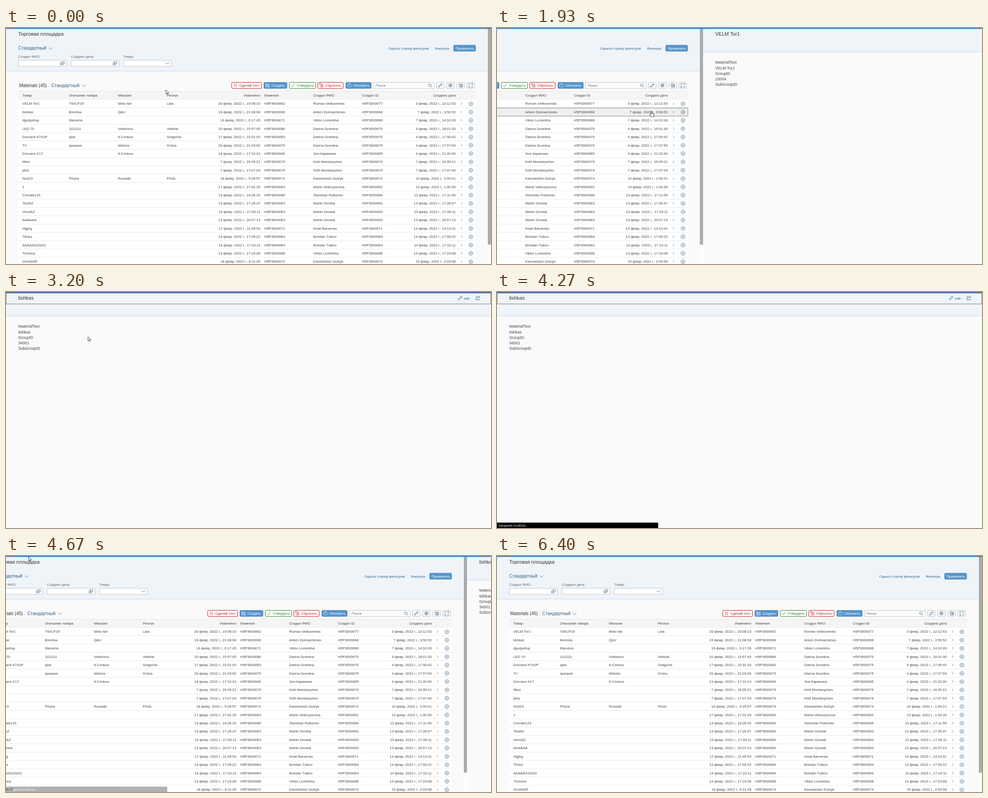
Recreate the animation shown at these times as an HTML page. Size 1071 by 523 pixels, loop 6540 ms.

```html
<!DOCTYPE html>
<html lang="ru">
<head>
<meta charset="utf-8">
<style>
html, body { margin: 0; width: 100%; height: 100%; overflow: hidden; background: #fafafa; }
svg { display: block; width: 100vw; height: 100vh; font-family: "Liberation Sans", Arial, sans-serif; }
.icon { fill: none; stroke-width: .9; }
</style>
</head>
<body>
<svg id="stage" viewBox="0 0 1071 523"></svg>
<script>
const LOOP = 6540, TICK = 200 / 3, W = 1071;
const ROW_TOP = 158.3, ROW_H = 18.42;
const BLUE = '#346187', RED = '#c4161c', GREEN = '#2b7c2b', FILL = '#5496cd', INK = '#444';

const people = {
  77: 'Roman Velikovenka', 68: 'Artem Dolmachenko', 88: 'Viktor Lomeisha', 75: 'Darina Sovelina',
  85: 'Зоя Карвенюк', 79: 'Kirill Mordanyshev', 74: 'Kanstantsin Dulvyk', 62: 'Marta Velkozyorova',
  86: 'Stanislav Polkenko', 83: 'Martin Dovbal', 71: 'Ihnat Barvenau', 84: 'Bohdan Tulkov'
};
// product | description | shop | region | changed | changed by | created by | created
const rows = `VELM Tor1|TW/LP29|Moto fair|Lida|20 23:08:10|62|77|3 12:12:53
tishkas|Brenlow|Q&amp;V||19 21:08:08|68|68|7 3:50:52
djyutjuirtuy|Marveno|||19 0:17:26|71|88|7 14:10:39
LED 70|1111111|Voltamira|Vitebsk|20 15:57:45|86|75|4 16:01:30
Dorvane KT42P|qwe|8 Contour|Soligorsk|17 23:31:20|83|75|4 17:00:42
TV|qweqwe|Molvira|Orsha|20 21:03:00|75|75|4 17:07:59
Dorvane K17||8 Contour||14 17:10:24|66|85|4 21:32:30
IBed||||7 16:35:21|79|79|7 16:35:21
jdsa||||7 17:07:04|79|79|7 17:07:04
No323|Phone|Ruvstall|Pinsk|18 5:29:57|74|74|10 1:00:21
1||||17 17:31:29|83|62|13 1:32:35
Corvale123||||13 19:26:32|86|86|13 17:11:59
TestAZ||||13 17:26:37|83|83|13 17:26:37
VimoAZ||||13 17:39:11|83|83|13 17:39:11
AAAAAA||||13 20:07:13|83|83|13 20:07:13
hfgjhg||||17 11:45:54|71|71|14 14:13:41
TExks||||14 17:09:22|84|84|14 17:09:22
AAAAASSSSS||||14 17:10:11|84|84|14 17:10:11
Trelvora||||14 17:23:08|88|88|14 17:23:08
Ovrelix65||||18 6:11:28|74|74|15 2:03:58`.split('\n').map(r => r.split('|'));

// Text is placed by its left (or end) edge and the middle of its capitals.
const text = (x, y, s, size = 7.8, fill = INK, more = '') =>
  `<text x="${x}" y="${y + size * .36}" font-size="${size}" fill="${fill}" ${more}>${s}</text>`;
const rect = (x, y, w, h, fill, more = '') =>
  `<rect x="${x}" y="${y}" width="${w}" height="${h}" fill="${fill}" ${more}/>`;
const box = (x, y, w, h, fill, stroke, r = 0) => rect(x, y, w, h, fill, `stroke="${stroke}" rx="${r}"`);
const icon = (x, y, d, color = BLUE) =>
  `<path class="icon" transform="translate(${x} ${y})" d="${d}" stroke="${color}"/>`;

const shapes = {
  chevron: 'M-4 -2L0 2L4 -2',
  next: 'M-1.3 -2.5L1.3 0L-1.3 2.5',
  copy: 'M-1 -3.5H4V1H-1ZM-1 -1H-4V3.5H1V1',
  wand: 'M-4 4L1 -1M2 -4V-2M4 -1H2.5M-2 -3.5V-1.5M-3 -2.5H-1M2.5 1.5V3.5M1.5 2.5H3.5M-1 -1L1 1',
  add: 'M-1 -3H-4V3.5H4V0M-4 -1H0M2.5 -4V0M.5 -2H4.5M-2 -4V-2M-2 1.5H2',
  check: 'M-3.5 0L-1 3L4 -3',
  reset: 'M-4 -4L4 4M-4 -1V-4H-1M0 -3.5A3.5 3.5 0 1 1 -3.3 1M1.5 -1.5L-1.5 1.5',
  refresh: 'M-3 3A4 4 0 0 1 1 -3.7M-1 -4.5L1.5 -3.7L0 -1.7M3.2 -2A4 4 0 0 1 -1 3.8',
  search: 'M1.8 1.8L4.2 4.2M2.3 -.6A2.9 2.9 0 1 1 -3.5 -.6A2.9 2.9 0 1 1 2.3 -.6',
  pencil: 'M-4 4L-3 1L2.5 -4L4 -2.5L-1.5 3ZM1 -2.7L2.7 -1',
  gear: 'M3 0A3 3 0 1 1 -3 0A3 3 0 1 1 3 0M1.2 0A1.2 1.2 0 1 1 -1.2 0A1.2 1.2 0 1 1 1.2 0' +
    'M0 -4.2V-3M0 3V4.2M-4.2 0H-3M3 0H4.2M-3 -3L-2.1 -2.1M3 3L2.1 2.1M-3 3L-2.1 2.1M3 -3L2.1 -2.1',
  export: 'M-3 -3.5H1L1.5 -2.5H4V3.5H-2.5V0M-.5 -.5H4M-.5 1.5H4M-4.5 -1.5H-1',
  full: 'M-4 -1.5V-4H-1.5M1.5 -4H4V-1.5M4 1.5V4H1.5M-1.5 4H-4V1.5M1.5 -1.5L4 -4M-1.5 1.5L-4 4',
  cross: 'M4.2 0A4.2 4.2 0 1 1 -4.2 0A4.2 4.2 0 1 1 4.2 0M-1.9 -1.9L1.9 1.9M1.9 -1.9L-1.9 1.9',
  share: 'M0 -3H-4V4H3V1M-1.5 1.5C-1.5 -1 0 -2.5 4 -2.5M2 -4.5L4.2 -2.5L2 -.5'
};

const button = (x, w, label, shape, color, filled) => {
  const ink = filled ? '#fff' : color;
  return box(x + .5, 120.5, w - 1, 13.5, filled ? color : '#fff', filled ? '#4a8bc3' : color, 2) +
    icon(x + 8.5, 127.3, shapes[shape], ink) + text(x + 17, 127.4, label, 7.8, ink);
};
const filter = (x, label, shape) => text(x, 62.7, label, 7.8, '#666') +
  box(x + .5, 71.5, 106, 13.5, '#fff', '#bfc3c7') + icon(x + 97.5, 78.2, shapes[shape]);
const date = s => s.replace(' ', ' февр. 2022 г., ');

const END = 'text-anchor="end"';
const columns = [[36, 'Товар'], [139, 'Описание товара'], [247, 'Магазин'], [355, 'Регион'],
  [561.5, 'Изменено', END], [570.5, 'Изменил'], [678.5, 'Создал ФИО'], [786, 'Создал ID'], [993, 'Создано дата', END]];

function tableRow(row, i) {
  const [product, about, shop, region, changed, editor, author, created] = row;
  const y = 167.6 + i * ROW_H;
  const cells = [product, about, shop, region, date(changed), 'H5P30000' + editor,
    people[author], 'H5P30000' + author, date(created)];
  return cells.map((s, c) => s && text(columns[c][0], y, s, 7.8, INK, columns[c][2])).join('') +
    icon(1006, y, shapes.next, '#777') + icon(1026.7, y + .3, shapes.cross) +
    rect(27, ROW_TOP + (i + 1) * ROW_H - .5, 1011, .8, '#e2e2e2');
}

const list = rect(0, 2, W, 521, '#fafafa') + rect(0, 2, W, 93, '#eff4f9') + rect(0, 95, W, 1.2, '#c8deef') +
  text(27, 13, 'Торговая площадка', 11, '#333') +
  text(27, 44.7, 'Стандартный', 10, BLUE) + icon(98.5, 45.3, shapes.chevron) +
  text(844, 44.7, 'Скрыть строку фильтров', 7.8, BLUE) + text(947, 44.7, 'Фильтры', 7.8, BLUE) +
  box(988.5, 38, 48.5, 13.5, FILL, '#4a8bc3', 2) + text(993, 44.8, 'Применить', 7.8, '#fff') +
  filter(27, 'Создал ФИО:', 'copy') + filter(143, 'Создано дата:', 'copy') + filter(259, 'Товар:', 'chevron') +
  text(29, 127, 'Materials (45)', 10, '#333') + rect(95, 121, 1, 12, '#ddd') +
  text(100, 127.3, 'Стандартный', 10, BLUE) + icon(171.5, 128, shapes.chevron) +
  button(498, 67, 'Сделай тост', 'wand', RED) + button(569, 52, 'Создать', 'add', FILL, true) +
  button(625, 59, 'Утвердить', 'check', GREEN) + button(688, 57, 'Сбросить', 'reset', RED) +
  button(750, 57, 'Обновить', 'refresh', FILL, true) +
  box(811.5, 120.5, 134, 13.5, '#fff', '#bfc3c7') + icon(936.5, 127.2, shapes.search) +
  text(816, 127.4, 'Поиск', 7.8, '#666', 'font-style="italic"') +
  ['pencil', 'gear', 'export', 'full'].map((s, i) =>
    box(950.5 + i * 22.4, 120.5, 17, 13.5, '#f7f7f7', '#bcc3c9', 2) + icon(959 + i * 22.4, 127.3, shapes[s])).join('') +
  rect(27, 140, 1011, 18.3, '#f5f5f5') + rect(27, 139.7, 1011, .8, '#e2e2e2') + rect(27, 157.8, 1011, .8, '#dedede') +
  columns.map(([x, s, more]) => text(x, 149.3, s, 7.8, INK, more)).join('') +
  rect(27, ROW_TOP + .3, 1011, 365, '#fff') + rect(27, 0, 1011, ROW_H, '#efefef', 'id="hover"') +
  rows.map(tableRow).join('') +
  rect(27.5, 177.2, 1010, 18, 'none', 'id="focus" stroke="#777" stroke-width=".9"') +
  rect(1064, 2, 7, 521, '#fdfdfd') + rect(1064, 2, 7, 478, '#ababab');

const details = rect(0, 2, W, 521, '#fafafa') + rect(0, 2, W, 51, '#eff4f9') + rect(0, 52.5, W, 1, '#bfdcee') +
  rect(.5, 2.5, 1070, 24, 'none', 'id="headFocus" stroke="#666" stroke-width=".9"') +
  text(27, 13, '', 11, '#333', 'id="title"') +
  icon(1003, 13.5, shapes.pencil) + text(1011, 13.7, 'edit', 7.8, BLUE) + icon(1042, 13.5, shapes.share) +
  ['MaterialText', '', 'GroupID', '', 'SubGroupID'].map((s, i) =>
    text(27, 76.2 + i * 12.25, s, 8.75, INK, `id="line${i}"`)).join('');

const $ = id => document.getElementById(id);
$('stage').innerHTML = `<g id="list">${list}</g><g id="details">${details}</g>` + rect(0, 0, W, 2, '#427cac') +
  `<g id="status">${rect(-3, 511, 359, 15, '#000', 'rx="2"')}${text(2.5, 517.3, 'Ожидание localhost...', 6.3, '#fff',
    'font-family="Open Sans, Noto Sans, sans-serif"')}</g>
  <path id="cursor" fill="#fff" stroke="#222" stroke-width=".85" stroke-linejoin="round"/>`;

const ARROW = 'M0 0V9.3L2.2 7.3L3.6 10.5L5 9.9L3.6 6.8H6.5Z';
const HAND = 'M-1 1Q0 -.8 1 1V5L5 6Q5.8 6.3 5.7 7.2L4.8 12.5H-.6L-3.8 8.6Q-3.8 7 -2.4 7.5L-1 8.6Z';
// Pointer path: tick, x, y
const path = [[0, 353, 137], [10, 345, 169], [13, 345, 169], [19, 341, 184], [36, 341, 184], [40, 324, 176],
  [42, 324, 176], [48, 181, 99], [51, 127, 78], [52, 127, 78], [58, 30, -14], [66, 40, -13], [70, 50, 1.5],
  [76, 150, 75], [81, 204, 200], [86, 69, 508], [90, 52, 530], [99, 52, 530]];

const clamp = v => Math.max(0, Math.min(1, v));
const ease = v => v < .5 ? .5 * (2 * v) ** 2.5 : 1 - .5 * (2 - 2 * v) ** 2.5;
const slide = (k, start, length) => ease(clamp((k - start) / length));
const show = (id, on) => $(id).setAttribute('visibility', on ? 'visible' : 'hidden');
const move = (id, x, y = 0) => $(id).setAttribute('transform', `translate(${x} ${y})`);

function pointer(k) {
  const i = path.findIndex(p => p[0] > k);
  const [a, x, y] = path[i - 1], [b, u, v] = path[i], f = (k - a) / (b - a);
  return [x + (u - x) * f, y + (v - y) * f];
}

function draw(now) {
  // Time advances in even ticks, and the pages slide by whole pixels.
  const k = Math.floor((now % LOOP + 4) / TICK);
  const shift = Math.round(W * (slide(k, 25.81, 6) - slide(k, 66.15, 4.8)));
  move('list', -shift);
  move('details', W - shift);

  const [x, y] = pointer(k);
  const overRows = y > ROW_TOP && (k < 32 || k > 70);
  move('cursor', x, y);
  $('cursor').setAttribute('d', overRows ? HAND : ARROW);
  show('hover', overRows && y < 523);
  $('hover').setAttribute('y', ROW_TOP + Math.floor((y - ROW_TOP) / ROW_H) * ROW_H);
  show('focus', k >= 25 && k < 33 || k > 70 && k < 96);

  const loaded = k >= 32;
  const name = rows[+loaded][0];
  $('title').textContent = $('line1').textContent = name;
  $('line3').textContent = loaded ? '34001' : '10004';
  show('headFocus', loaded && k < 67);

  $('status').setAttribute('opacity', k < 64 ? 0 : clamp((71 - k) * .3));
  requestAnimationFrame(draw);
}
requestAnimationFrame(draw);
</script>
</body>
</html>
```
